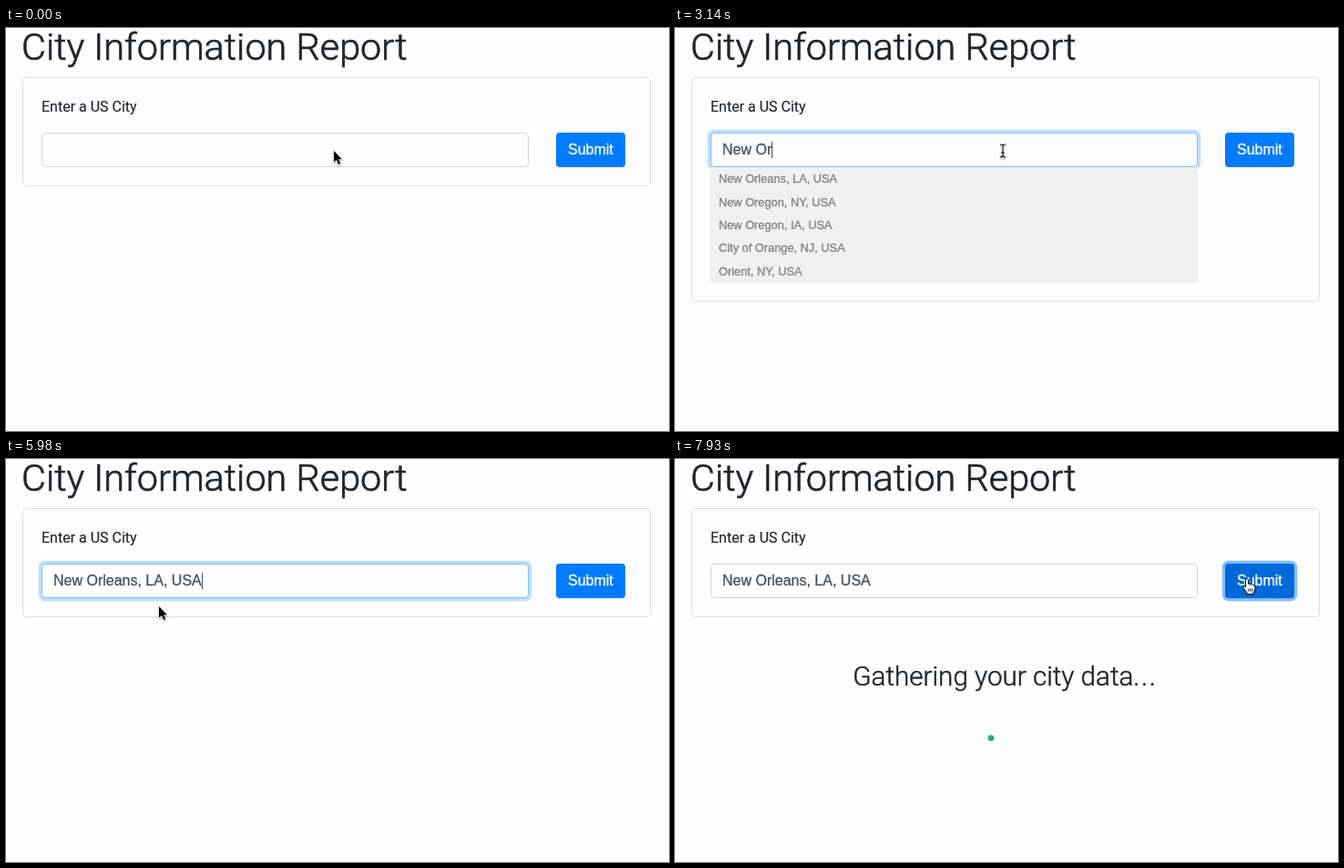
Recreate the animation shown at these times as an HTML page. Size 728 by 443 pixels, loop 8000 ms.

```html
<!DOCTYPE html>
<html lang="en">
<head>
<meta charset="utf-8">
<title>City Information Report</title>
<style>
  html, body { margin: 0; width: 100%; height: 100%; overflow: hidden; background: #fefefe; }
  svg { display: block; }
  text {
    font: 16px "Liberation Sans", Arial, sans-serif; white-space: pre;
    color: #495057; fill: currentColor; stroke: currentColor; stroke-width: .3px;
  }
  .roboto { font-family: Roboto, sans-serif; color: #212529; stroke-width: .15px; }
  .title { font-size: 41.4px; font-weight: 300; stroke-width: .7px; }
  .status { font-size: 29.6px; font-weight: 300; stroke-width: .5px; }
  .status tspan { letter-spacing: 1.6px; }
  .submit { color: #fff; }
  .list text { font-size: 12.8px; color: #808080; }
  #pointer { filter: drop-shadow(0 1px 1px rgba(0, 0, 0, .35)); }
</style>
</head>
<body>
<svg width="728" height="443" viewBox="0 0 728 443">
  <text class="roboto title" x="17" y="35">City Information Report</text>
  <rect id="card" x="18.5" y="54.5" width="689" rx="4" fill="#fefefe" stroke="#dfdfdf"/>
  <text class="roboto" x="39" y="92">Enter a US City</text>

  <rect id="inputGlow" x="35.8" y="111.8" width="541.4" height="44.4" rx="7" fill="#bfdeff"/>
  <rect id="input" x="39.5" y="115.5" width="534" height="37" rx="4" fill="#fefefe"/>
  <text id="typed" x="52" y="139"></text>
  <rect id="caret" y="125" width="1" height="18" fill="#495057"/>

  <g id="list" class="list">
    <rect x="39" y="153" width="535" height="127" fill="#f0f0f0"/>
  </g>

  <rect id="buttonGlow" x="600.8" y="111.8" width="82.4" height="44.4" rx="7" fill="#80bdff"/>
  <rect id="button" x="604" y="115" width="76" height="38" rx="4"/>
  <text class="submit" x="617" y="139">Submit</text>

  <g id="loading">
    <text class="roboto status" x="195.3" y="249">Gathering your city data<tspan>...</tspan></text>
    <g id="dots"></g>
  </g>

  <g id="pointer">
    <path id="arrow" d="M0 0V12.6L3 10L5.2 15L7.3 14.1L5.2 9.2H9Z" stroke="#fff" stroke-width="1.4" paint-order="stroke"/>
    <g id="beam" fill="none">
      <path d="M-3-7Q0-7 0-5V5Q0 7-3 7M3-7Q0-7 0-5M0 5Q0 7 3 7M-2 2H2" stroke="#fff" stroke-width="2.6"/>
      <path d="M-3-7Q0-7 0-5V5Q0 7-3 7M3-7Q0-7 0-5M0 5Q0 7 3 7M-2 2H2" stroke="#111" stroke-width="1.2"/>
    </g>
    <path id="hand" d="M-1.5 1Q0-1 1.5 1V6Q3 5 4 6.5Q5.5 5.6 6.5 7Q8.6 6.6 8.9 8.6V11Q8.6 14 7 15.2V17H0V15.4Q-2 13-4 9.7Q-4.4 7.4-2.5 8L-1.5 9.4ZM1.7 11V14M3.7 11V14M5.7 11V14" fill="#fff" stroke="#111"/>
  </g>
</svg>
<script>
const LOOP = 8000, STEP = 150;
const SVG = "http://www.w3.org/2000/svg";
const $ = id => document.getElementById(id);
const show = (id, on) => $(id).setAttribute("visibility", on ? "inherit" : "hidden");
const set = (el, attrs) => { for (const k in attrs) el.setAttribute(k, attrs[k]); return el; };
const add = (parent, tag, attrs) => parent.appendChild(set(document.createElementNS(SVG, tag), attrs));

// Value of the latest [time, value] pair that has started.
const latest = (track, t) => track.filter(([start]) => start <= t).pop()[1];

const typing = [[0, ""], [1650, "N"], [1950, "New"], [2240, "New "], [2840, "New O"],
  [2990, "New Or"], [3740, "New Orleans, LA, USA"]];
const caretOn = [[0, 0], [150, 1], [600, 0], [1200, 1], [3440, 0], [3740, 1], [4190, 0],
  [4790, 1], [5240, 0], [5690, 1], [6280, 0], [6730, 1], [7180, 0]];
const suggestions = [
  [0, []],
  [1950, ["New Braunfels, TX", "NY", "New Orleans, LA", "Nashville, TN", "New York, IA"]],
  [2090, ["New Braunfels, TX", "New York, NY", "New Orleans, LA", "New Haven, CT", "New York, IA"]],
  [2540, ["New York, NY", "New Orleans, LA", "New Hyde Park, NY", "New Braunfels, TX", "New Haven, CT"]],
  [3140, ["New Orleans, LA", "New Oregon, NY", "New Oregon, IA", "City of Orange, NJ", "Orient, NY"]],
  [5980, []]
];

// Pointer positions, one per step from the given start time.
const moves = [
  [0, [[360, 135]]],
  [4640, [[382, 134], [408, 134], [390, 152], [320, 170], [240, 176], [190, 168], [168, 162]]],
  [5980, [[168, 162], [230, 160], [370, 151], [520, 142], [596, 136], [628, 131.5]]]
];

function pointerAt(t) {
  const [start, points] = moves.filter(m => m[0] <= t).pop();
  return points[Math.min(points.length - 1, Math.floor((t - start) / STEP))];
}

function pointerKind(t, x, y, listOpen) {
  if (t < 150) return "arrow";
  const inField = x > 39 && x < 574;
  if (inField && y > 115 && y < 153) return "beam";
  if (x > 604 || (listOpen && inField && y >= 153)) return "hand";
  return "arrow";
}

const rows = [0, 1, 2, 3, 4].map(i =>
  add($("list"), "text", { x: 48, y: Math.round(170.2 + 25.4 * i) }));

// Colour, start angle in degrees and share of the spin after which the dot is gone.
const dots = [["#27a783", -104, .5], ["#33435c", -34, .65], ["#e6d569", 33, .3],
  ["#c0404e", 77, .9], ["#27a783", 145, 2], ["#e6d569", 212, .8]]
  .map(([fill, angle, end]) => ({
    angle, end,
    halo: add($("dots"), "ellipse", { fill, rx: 6, ry: 5 }),
    core: add($("dots"), "ellipse", { fill })
  }));

function drawLoader(t) {
  const p = Math.floor((t - 7180) / STEP) / 5;
  const radius = 31 - 14 * p * p;
  for (const { angle, end, halo, core } of dots) {
    const a = (angle + 55 * p) * Math.PI / 180;
    const at = { cx: 363 + radius * Math.cos(a), cy: 312.5 + radius * Math.sin(a) };
    const alive = p < end ? 1 : 0;
    set(halo, { ...at, opacity: alive * .35 * (1 - p) });
    set(core, { ...at, rx: 4.4 - p, ry: 4 - .8 * p, opacity: alive });
  }
}

function draw(t) {
  const items = latest(suggestions, t);
  const open = items.length > 0;
  const focused = t >= 150 && t < 7180;
  const loading = t >= 7180;
  const [x, y] = pointerAt(t);
  const kind = pointerKind(t, x, y, open);

  set($("card"), { height: open ? 246 : 119 });
  show("list", open);
  rows.forEach((row, i) => row.textContent = open ? items[i] + ", USA" : "");

  set($("inputGlow"), { opacity: focused ? (t < 300 ? .6 : 1) : 0 });
  set($("input"), { stroke: focused ? "#80bdff" : "#ced4da" });
  $("typed").textContent = latest(typing, t);
  set($("caret"), { x: Math.round(52 + $("typed").getComputedTextLength()) });
  show("caret", latest(caretOn, t));

  set($("button"), { fill: x > 604 ? "#0069d9" : "#007bff" });
  show("buttonGlow", loading);
  show("loading", loading);
  if (loading) drawLoader(t);

  set($("pointer"), { transform: `translate(${x} ${y})` });
  for (const shape of ["arrow", "beam", "hand"]) show(shape, shape === kind);
}

const begin = performance.now();
function tick() {
  draw((performance.now() - begin) % LOOP);
  requestAnimationFrame(tick);
}
tick();
</script>
</body>
</html>
```
